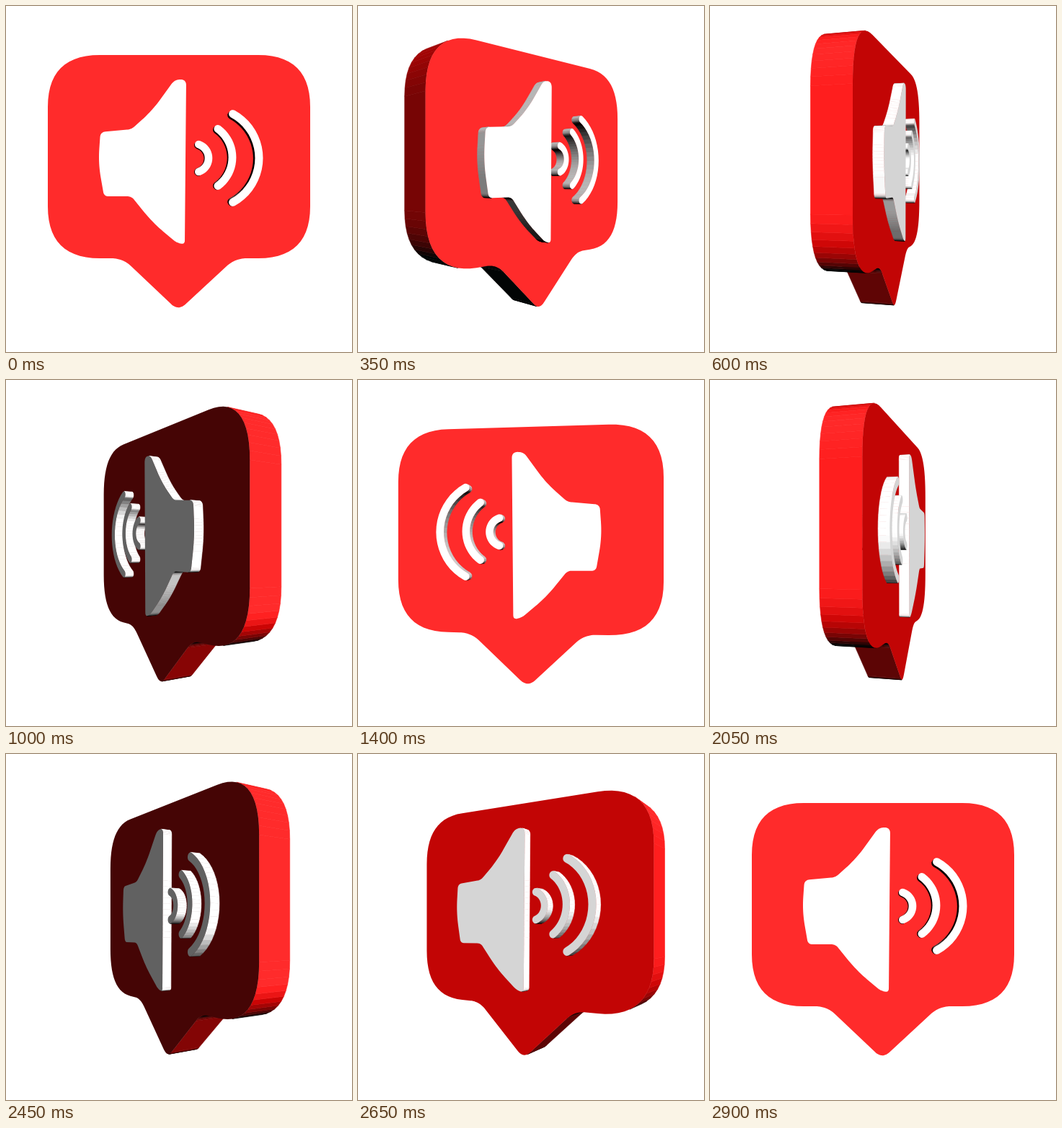
Write an HTML page with a canvas that moves like this. It is 480 by 480 pixels and loops after 2950 ms.

```html
<!DOCTYPE html>
<html lang="en">
<head>
<meta charset="utf-8">
<title>Rotating sound badge</title>
<style>
  html, body { margin: 0; width: 100%; height: 100%; overflow: hidden; background: #fff; }
  canvas { display: block; width: 480px; height: 480px; }
</style>
</head>
<body>
<canvas id="stage" width="480" height="480"></canvas>
<script>
const ctx = document.getElementById('stage').getContext('2d');

const STEP = 50, STEPS = 59;
const CX = 238.8, CY = 240, CAMERA = 676, FOCAL = 655;
const FRONT = 18.3, BACK = -29.7, RELIEF = 14, BACK_SHIFT = 9;

const clamp = (v, lo, hi) => Math.max(lo, Math.min(hi, v));
const scaleAt = z => FOCAL / (CAMERA - z);

// Polygon with rounded corners: each corner is [x, y, tangent length].
function rounded(corners, segments = 10) {
  const n = corners.length, out = [];
  const toward = ([x, y, r], [tx, ty]) => {
    const k = r / Math.hypot(tx - x, ty - y);
    return [x + (tx - x) * k, y + (ty - y) * k];
  };
  corners.forEach((p, i) => {
    const a = toward(p, corners[(i + n - 1) % n]);
    const b = toward(p, corners[(i + 1) % n]);
    for (let s = 0; s <= segments; s++) {
      const t = s / segments, u = 1 - t;
      out.push([0, 1].map(k => u * u * a[k] + 2 * u * t * p[k] + t * t * b[k]));
    }
  });
  return out;
}

// Thick arc opening to the left, with round caps.
function wave(x, y, radius, spread, half) {
  const out = [];
  const arc = (cx, cy, r, from, to, count) => {
    for (let i = 0; i <= count; i++) {
      const a = from + (to - from) * i / count;
      out.push([cx + r * Math.cos(a), cy + r * Math.sin(a)]);
    }
  };
  const cap = (a, start) =>
    arc(x + radius * Math.cos(a), y + radius * Math.sin(a), half, start, start + Math.PI, 8);
  arc(x, y, radius + half, -spread, spread, 20);
  cap(spread, spread);
  arc(x, y, radius - half, spread, -spread, 20);
  cap(-spread, Math.PI - spread);
  return out;
}

// Stage outline seen at depth z, turned into model units.
const toModel = (outline, z) =>
  outline.map(([x, y]) => [(x - CX) / scaleAt(z), (y - CY) / scaleAt(z)]);

const red = light => {
  const v = light * 1.08;
  const rest = clamp((v - 0.75) * 120, 5, 43);
  return `rgb(${clamp(v * 255, 0, 255)},${rest},${rest})`;
};
const white = light => {
  const v = clamp((light + 0.13) * 255, 0, 255);
  return `rgb(${v},${v},${v})`;
};

const body = {
  outline: toModel(rounded([
    [58, 68, 72], [422, 68, 72], [422, 350, 72], [318, 350, 16],
    [239, 423, 14], [162, 350, 16], [58, 350, 72]
  ], 14), FRONT),
  low: BACK, high: FRONT, paint: red
};

const iconOutlines = [
  rounded([
    [131, 175, 7], [174, 171, 6], [203, 145, 20], [234, 102, 8], [250, 102, 8],
    [249, 215, 40], [248, 331, 6], [236, 328, 6], [203, 300, 20], [174, 264, 6],
    [136, 264, 6], [128, 218, 20]
  ]),
  wave(261, 211, 20, 1.25, 5.3),
  wave(265, 210, 49, 0.94, 5.4),
  wave(281, 211, 70, 1.07, 5.5)
].map(o => toModel(o, FRONT + RELIEF));

const frontIcon = iconOutlines.map(outline =>
  ({ outline, low: FRONT, high: FRONT + RELIEF, paint: white }));
const backIcon = iconOutlines.map(outline => ({
  outline: outline.map(([x, y]) => [x + BACK_SHIFT, y]),
  low: BACK - RELIEF, high: BACK, paint: white
}));

function render(angle) {
  const c = Math.cos(angle), s = Math.sin(angle);
  const turn = (x, y, z) => [x * c + z * s, y, z * c - x * s];
  const facing = (n, p) => n[2] * (CAMERA - p[2]) - n[0] * p[0] - n[1] * p[1] > 0;
  const lightOn = n => 0.43 * n[0] - 0.4 * n[1] + 1.08 * n[2];

  function fill(points, color, seam) {
    ctx.beginPath();
    for (const [x, y, z] of points) {
      const k = scaleAt(z);
      ctx.lineTo(CX + x * k, CY + y * k);
    }
    ctx.closePath();
    ctx.fillStyle = ctx.strokeStyle = color;
    ctx.fill();
    if (seam) ctx.stroke();
  }

  function drawPrism({ outline, low, high, paint }) {
    const bottom = outline.map(([x, y]) => turn(x, y, low));
    const top = outline.map(([x, y]) => turn(x, y, high));
    const walls = [];
    outline.forEach(([x, y], i) => {
      const j = (i + 1) % outline.length;
      const dx = outline[j][0] - x, dy = outline[j][1] - y;
      const length = Math.hypot(dx, dy);
      if (length < 1e-6) return;
      const normal = turn(dy / length, -dx / length, 0);
      if (facing(normal, top[i])) {
        const quad = [bottom[i], bottom[j], top[j], top[i]];
        walls.push({ quad, normal, depth: quad.reduce((sum, p) => sum + p[2], 0) });
      }
    });
    walls.sort((a, b) => a.depth - b.depth);
    for (const { quad, normal } of walls) fill(quad, paint(lightOn(normal)), true);
    for (const [cap, dir] of [[bottom, -1], [top, 1]]) {
      const normal = turn(0, 0, dir);
      if (facing(normal, cap[0])) fill(cap, paint(lightOn(normal)), false);
    }
  }

  const depth = ({ outline, low }) =>
    outline.reduce((sum, [x, y]) => sum + turn(x, y, low)[2], 0) / outline.length;
  const drawIcon = icon =>
    [...icon].sort((a, b) => depth(a) - depth(b)).forEach(drawPrism);

  ctx.fillStyle = '#fff';
  ctx.fillRect(0, 0, 480, 480);
  ctx.lineWidth = 0.6;
  ctx.lineJoin = 'round';

  // Icons on faces turned away go behind the body.
  const frontSeen = CAMERA * c > FRONT, backSeen = CAMERA * c < BACK;
  if (!frontSeen) drawIcon(frontIcon);
  if (!backSeen) drawIcon(backIcon);
  drawPrism(body);
  if (frontSeen) drawIcon(frontIcon);
  if (backSeen) drawIcon(backIcon);
}

const start = performance.now();
function tick() {
  const step = Math.floor((performance.now() - start) / STEP) % STEPS;
  render(step / (STEPS - 1) * 2 * Math.PI);
  requestAnimationFrame(tick);
}
tick();
</script>
</body>
</html>
```
